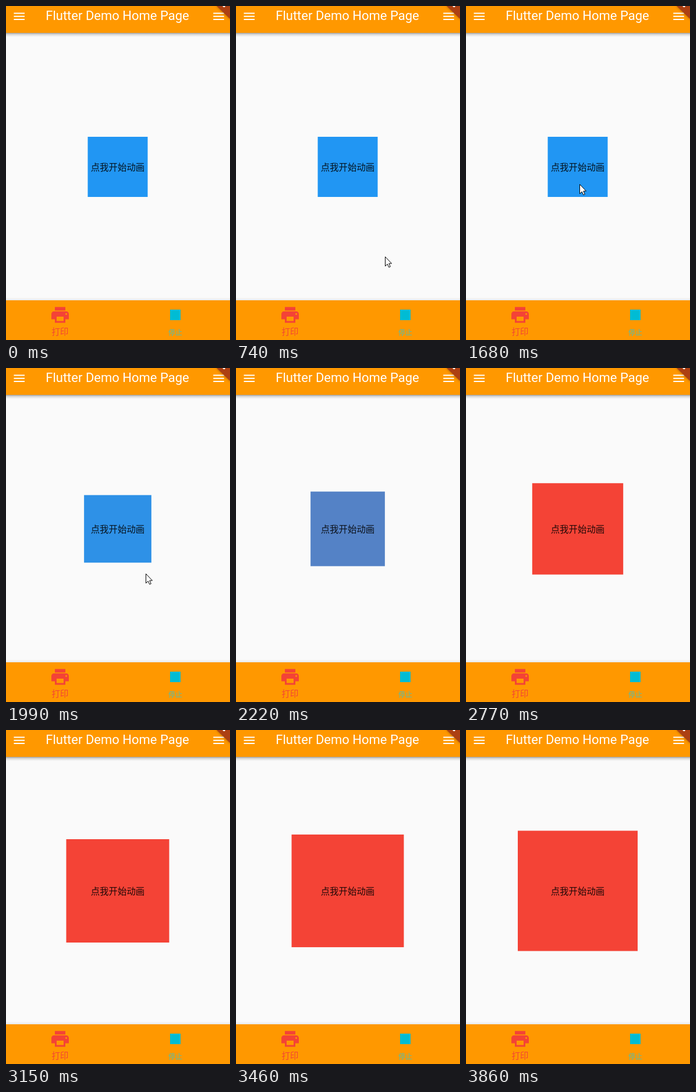
Recreate the animation shown at these times as an HTML page. Size 385 by 572 pixels, loop 4320 ms.

```html
<!DOCTYPE html>
<html lang="zh-CN">
<head>
<meta charset="utf-8">
<title>Flutter Demo</title>
<style>
  html, body { margin: 0; width: 100%; height: 100%; overflow: hidden; background: #fafafa; }
  svg { display: block; width: 385px; height: 572px; }
  text { text-anchor: middle; font-family: "Noto Sans CJK SC", "Noto Sans CJK", sans-serif; }
  .title { font: 22px Roboto, sans-serif; fill: #fff; }
</style>
</head>
<body>
<svg viewBox="0 0 385 572">
  <defs>
    <linearGradient id="topShadow" x2="0" y2="1">
      <stop stop-opacity=".36"/>
      <stop offset=".4" stop-opacity=".13"/>
      <stop offset="1" stop-opacity="0"/>
    </linearGradient>
    <linearGradient id="bottomShadow" x2="0" y2="1">
      <stop stop-opacity="0"/>
      <stop offset="1" stop-opacity=".07"/>
    </linearGradient>
    <filter id="soft" x="-50%" y="-50%" width="200%" height="200%">
      <feGaussianBlur stdDeviation="2"/>
    </filter>
    <path id="menu" d="M0 0h18.5v2H0zM0 5.2h18.5v2H0zM0 10.4h18.5v2H0z" fill="#fff"/>
  </defs>

  <rect width="385" height="572" fill="#fafafa"/>
  <rect y="46" width="385" height="7" fill="url(#topShadow)"/>
  <rect width="385" height="46" fill="#ff9800"/>
  <use href="#menu" x="13.5" y="11.5"/>
  <use href="#menu" x="356.3" y="11.5"/>
  <text class="title" x="191.5" y="24">Flutter Demo Home Page</text>
  <path d="M361 -1H387V24Z" opacity=".4" filter="url(#soft)"/>
  <path d="M362 0H385V22Z" fill="#ad4013"/>
  <path d="M372 0h5l-1 2h-2z" fill="#fff"/>

  <rect y="499" width="385" height="5" fill="url(#bottomShadow)"/>
  <rect y="504" width="385" height="68" fill="#ff9800"/>
  <g fill="#f44336">
    <path transform="translate(75 511) scale(1.5)" d="M19 8H5c-1.66 0-3 1.34-3 3v6h4v4h12v-4h4v-6c0-1.66-1.34-3-3-3zm-3 11H8v-5h8v5zm3-7c-.55 0-1-.45-1-1s.45-1 1-1 1 .45 1 1-.45 1-1 1zm-1-9H6v4h12V3z"/>
    <text x="93" y="563" font-size="14.4">打印</text>
  </g>
  <rect x="282" y="520" width="18" height="18" fill="#00bcd4"/>
  <text x="291" y="563.5" font-size="12" fill="#4fbfb0">停止</text>

  <rect id="box"/>
  <text x="192" y="282" font-size="15.45" fill-opacity=".87">点我开始动画</text>
  <path id="cursor" d="M.5 .5V16.5L4.2 13L6.8 18.5L9.3 17.4L6.8 12H11.5Z" fill="#fff" stroke="#000"/>
</svg>
<script>
const LOOP = 4320;
const box = document.getElementById("box");
const cursor = document.getElementById("cursor");
const BLUE = [33, 150, 243], RED = [244, 67, 54];

// Screen refreshes come in evenly spaced bursts: [first, last, count].
const bursts = [
  [740, 1220, 7], [1310, 1680, 6], [1830, 2290, 7],
  [2370, 2840, 7], [2920, 3390, 7], [3460, 3710, 4]
];

// Pointer positions: [time, x, y].
const pointer = [
  [740, 256, 429], [1220, 199, 328], [1384, 183, 293],
  [1680, 195, 305], [1830, 195, 305], [2060, 256, 368]
];

const clamp = v => Math.max(0, Math.min(1, v));
const mix = (a, b, t) => a + (b - a) * t;
const smooth = t => t * t * (3 - 2 * t);

function refreshTime(t) {
  const burst = bursts.filter(b => t >= b[0]).pop();
  if (!burst) return 0;
  const [first, last, count] = burst;
  const step = (last - first) / (count - 1);
  return first + step * Math.min(count - 1, Math.floor((t - first + 8) / step));
}

function drawPointer(t) {
  const i = pointer.findIndex((p, n) => n && t <= p[0]);
  const visible = t >= pointer[0][0] && i > 0;
  cursor.style.display = visible ? "" : "none";
  if (!visible) return;
  const [t0, x0, y0] = pointer[i - 1], [t1, x1, y1] = pointer[i];
  const k = smooth((t - t0) / (t1 - t0));
  cursor.setAttribute("transform", `translate(${Math.round(mix(x0, x1, k))} ${Math.round(mix(y0, y1, k))})`);
}

function drawBox(t) {
  const progress = t < 1830 ? 0 : clamp((t - 1740) / 1970);
  const size = 103 * (1 + progress);
  const tint = clamp((progress / 0.49) ** 2);
  box.setAttribute("x", 192 - size / 2);
  box.setAttribute("y", 275.5 - size / 2);
  box.setAttribute("width", size);
  box.setAttribute("height", size);
  box.setAttribute("fill", `rgb(${BLUE.map((c, i) => Math.round(mix(c, RED[i], tint)))})`);
}

function draw() {
  const t = refreshTime(performance.now() % LOOP);
  drawBox(t);
  drawPointer(t);
  requestAnimationFrame(draw);
}
draw();
</script>
</body>
</html>
```
